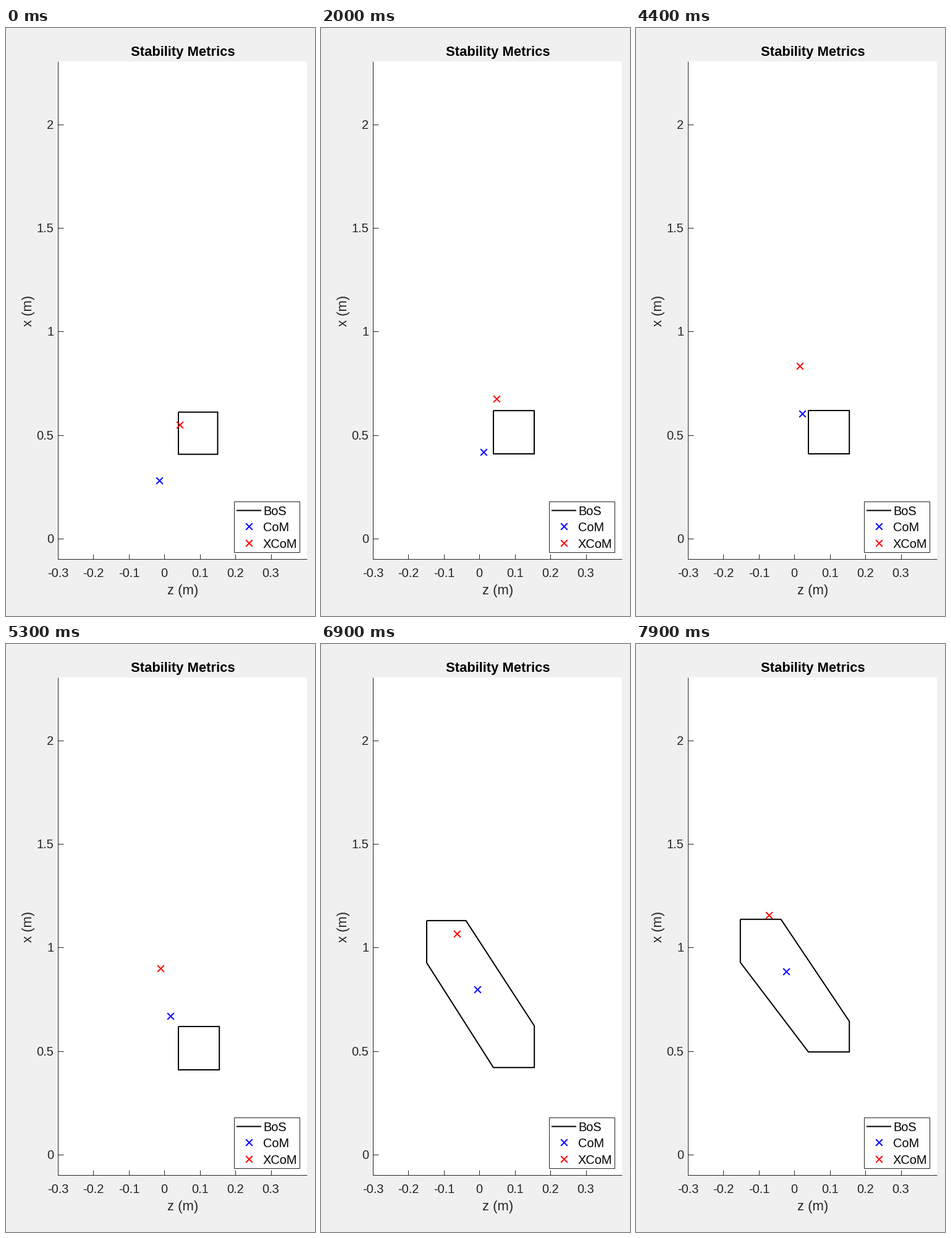
Write a matplotlib script that moves like this. It is 500 px wide and 950 px high and loops after 8000 ms.

```python
import numpy as np
import matplotlib.pyplot as plt
from matplotlib.animation import FuncAnimation
from matplotlib.patches import Rectangle

W, H, DPI = 500, 950, 100
PX = 72 / DPI          # points per pixel
FRAMES, STEP_MS = 80, 100
HOLD = 4               # last frame of the opening pause
STEP = 65              # frames per walking step
STEP_LEN = 173.7       # pixels walked per step
CONTACT = 65           # frame at which the second foot lands
HEEL_OFF = 60          # frame at which the first heel starts to rise
LEAD = 31              # frames by which XCoM runs ahead of CoM
MIRROR = 513.5         # left x + right x of mirrored footprints
INK = "#262626"

plt.rcParams["font.family"] = "Liberation Sans"


def com_at(n):
    """Centre of mass: steady walk with sway per stride and surge per step."""
    m = n - HOLD
    sway = np.pi * m / STEP
    surge = 2 * sway
    x = 251 + 19.45 * np.sin(sway) + 0.75 * np.sin(3 * sway) - 2.5 * np.cos(sway)
    y = (730 - 2.665 * m + 1.5 * np.cos(surge) - 1.9 * np.sin(surge)
         + 0.2 * np.cos(2 * surge) - 0.25 * np.sin(2 * surge))
    return np.array([x, y])


def xcom_at(n):
    """Extrapolated centre of mass: position plus scaled velocity."""
    return com_at(n) + LEAD * (com_at(n + 0.5) - com_at(n - 0.5))


def footprint(age):
    """Inner, top, outer and bottom edge of a foot that settles on the floor."""
    settle = np.exp(-max(age, 0) / 6)
    return 279, 618 + 2.6 * settle, 345.2 - 2.7 * settle, 688 + 0.7 * settle


def support(n):
    """Outline of the base of support: one foot, or the hull of both."""
    l, t, r, b = footprint(n - HOLD)
    lift = 0.0088 * max(n - HEEL_OFF, 0) ** 2.75
    t, b = t - 0.29 * lift, b - lift
    if n < CONTACT:
        pts = [(l, t), (r, t), (r, b), (l, b)]
    else:
        inner, t2, outer, b2 = footprint(n - HOLD - STEP)
        t2, b2 = t2 - STEP_LEN, b2 - STEP_LEN
        l2, r2 = MIRROR - outer, MIRROR - inner
        pts = [(l2, t2), (r2, t2), (r, t), (r, b), (l, b), (l2, b2)]
    return np.array(pts + pts[:1])


fig = plt.figure(figsize=(W / DPI, H / DPI), dpi=DPI, facecolor="#f0f0f0")
ax = fig.add_axes([0, 0, 1, 1])
ax.set_xlim(0, W)
ax.set_ylim(H, 0)
ax.axis("off")


def line(xs, ys, color=INK, width=1, **kw):
    return ax.plot(xs, ys, color=color, lw=width * PX,
                   solid_capstyle="butt", **kw)[0]


def cross_points(x, y, r=5.3):
    return [x - r, x + r, np.nan, x - r, x + r], [y - r, y + r, np.nan, y + r, y - r]


def cross(x, y, color, zorder=5):
    return line(*cross_points(x, y), color, 2, zorder=zorder)


def label(x, y, s, size=20, ha="center", color=INK, **kw):
    ax.text(x, y, s, fontsize=size * PX, ha=ha, va="baseline", color=color, **kw)


# axes
ax.add_patch(Rectangle((84, 54), 403, 804, fc="white", ec="none", zorder=0))
line([84, 84], [54, 858])
line([84, 487], [858, 858])
for k in range(7):
    x = 84 + 57.43 * k
    line([x, x], [850, 858])
    label(x, 887, f"{(k - 3) / 10:g}")
for k in range(5):
    y = 825 - 167.3 * k
    line([84, 93], [y, y])
    label(77.5, y + 7, f"{k / 2:g}", ha="right")
label(286, 45, "Stability Metrics", 22, color="black", weight="bold")
label(286, 915, "z (m)", 22)
label(42, 456.5, "x (m)", 22, rotation=90, rotation_mode="anchor")

bos = line([], [], "black", 2, solid_joinstyle="round", zorder=4, snap=False)
com = cross(0, 0, "blue")
xcom = cross(0, 0, "red")

# legend
ax.add_patch(Rectangle((369, 765), 106, 82, fc="white", ec=INK, lw=PX, zorder=6))
line([373, 413], [779.5, 779.5], "black", 2, zorder=7, snap=False)
cross(393.5, 805.5, "blue", 7)
cross(393.5, 832.5, "red", 7)
for y, name in zip((787, 813, 840), ("BoS", "CoM", "XCoM")):
    label(416, y, name, ha="left", color="black", zorder=7)


def update(i):
    n = max(i, HOLD)
    bos.set_data(*support(n).T)
    for mark, place in ((com, com_at), (xcom, xcom_at)):
        mark.set_data(*cross_points(*(np.floor(place(n)) + 0.5)))
    return bos, com, xcom


anim = FuncAnimation(fig, update, frames=FRAMES, interval=STEP_MS,
                     init_func=lambda: update(0), repeat=True, repeat_delay=0)
plt.show()
```
